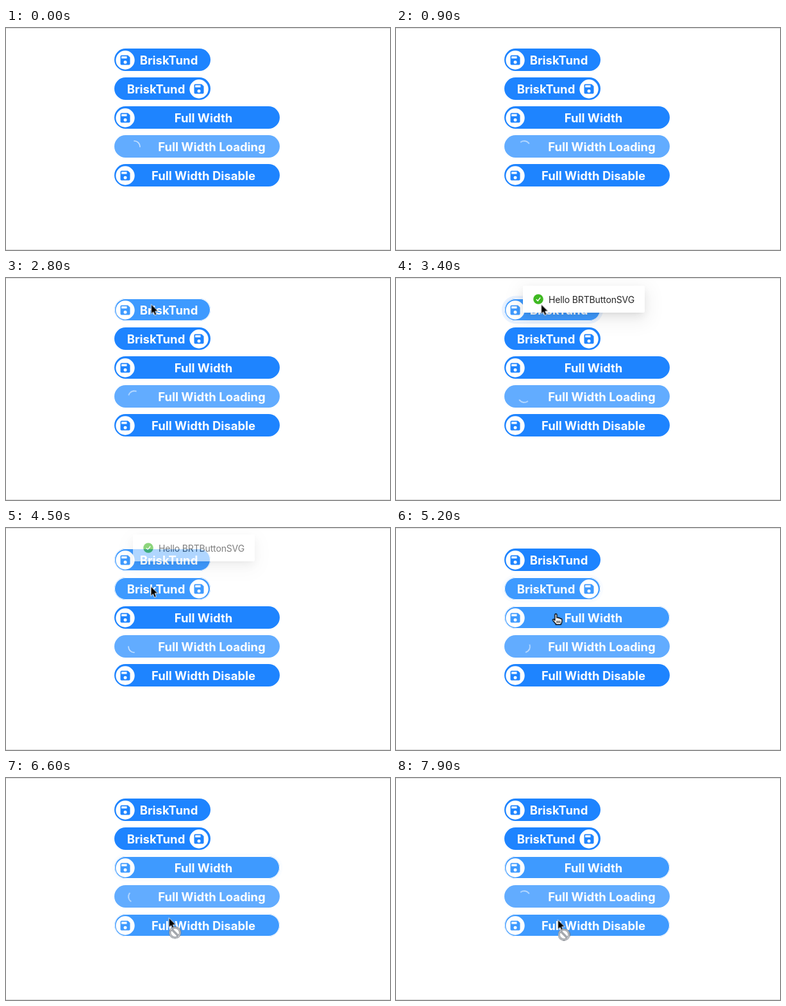
Animation of 599x346 px, one loop 8000 ms. Source, as an HTML page:

```html
<!DOCTYPE html>
<html lang="en">
<head>
<meta charset="utf-8">
<title>Buttons</title>
<style>
  html, body { margin: 0; width: 100%; height: 100%; overflow: hidden; background: #fff; }
  body { position: relative; font-family: Inter, "Liberation Sans", sans-serif; }
  .stage { position: absolute; left: 0; top: 0; width: 599px; height: 346px; overflow: hidden; }
  .rule { position: absolute; left: 0; right: 0; height: 1px; background: #dcdcdc; }

  .btn {
    position: absolute; left: 169px; width: 258px; height: 35px;
    border-radius: 17.5px; color: #1e84ff; background: currentColor;
  }
  .short { width: 150px; }
  .loading { background: #62acff; }
  .label {
    position: absolute; left: var(--mid); top: 0; transform: translateX(-50%);
    font-size: 18.5px; font-weight: 700; line-height: 36px; white-space: nowrap; color: #fff;
  }
  .icon { position: absolute; left: 2px; top: 2.5px; width: 30px; height: 30px; }
  .right .icon { left: auto; right: 3px; }

  .b1 { top: 32px; --mid: 85px; animation: lit1 8s linear infinite; }
  .b2 { top: 77px; --mid: 65px; animation: lit2 8s linear infinite; }
  .b3 { top: 122px; --mid: 139px; animation: lit3 8s linear infinite; }
  .b4 { top: 167px; --mid: 152px; }
  .b5 { top: 212px; --mid: 139px; animation: lit5 8s linear infinite; }
  @keyframes lit1 {
    0%, 31.5%, 58.5%, 100% { color: #1e84ff; box-shadow: inset 0 0 0 1px #fff0; }
    34%, 56.5% { color: #3e9aff; box-shadow: inset 0 0 0 1px #fff; }
  }
  @keyframes lit2 {
    0%, 50%, 71.5%, 100% { color: #1e84ff; box-shadow: inset 0 0 0 1px #fff0; }
    52.5%, 69.5% { color: #3e9aff; box-shadow: inset 0 0 0 1px #fff; }
  }
  @keyframes lit3 {
    0%, 61% { color: #1e84ff; box-shadow: inset 0 0 0 1px #fff0; }
    64%, 100% { color: #3e9aff; box-shadow: inset 0 0 0 1px #fff; }
  }
  @keyframes lit5 {
    0%, 78.5% { color: #1e84ff; box-shadow: inset 0 0 0 1px #fff0; }
    81.5%, 100% { color: #3e9aff; box-shadow: inset 0 0 0 1px #fff; }
  }

  /* Each click starts a toast and, just after, a fading ring */
  .c1 { --at: 3.15s; }
  .c2 { --at: 4.4s; }
  .c3 { --at: 5.66s; }
  .wave {
    --ring: calc(var(--at) + .1s);
    position: absolute; inset: 0; border-radius: 17.5px; opacity: 0;
    animation: spread 8s var(--ring) infinite, fade 8s var(--ring) infinite;
  }
  @keyframes spread {
    0% { box-shadow: 0 0 0 0 #1e84ff; animation-timing-function: cubic-bezier(.08, .82, .17, 1); }
    5%, 100% { box-shadow: 0 0 0 4.5px #1e84ff; }
  }
  @keyframes fade {
    0% { opacity: .2; animation-timing-function: cubic-bezier(.08, .82, .17, 1); }
    25%, 100% { opacity: 0; }
  }

  .spinner {
    position: absolute; left: 20.5px; top: 8.3px; width: 20px; height: 20px;
    animation: spin 1s linear infinite;
  }
  .spinner path { fill: none; stroke: #fff; stroke-opacity: .65; stroke-width: 1.7; stroke-linecap: round; }
  @keyframes spin { to { transform: rotate(360deg); } }

  .toast {
    position: absolute; left: 198px; top: 12px; width: 190px; height: 42px;
    border-radius: 2px; background: #fff; opacity: 0;
    box-shadow: 0 3px 6px -4px rgba(0,0,0,.12), 0 6px 16px rgba(0,0,0,.08), 0 9px 28px 8px rgba(0,0,0,.05);
    animation: toast 8s linear var(--at) infinite;
  }
  .toast svg { position: absolute; left: 16px; top: 13px; width: 16px; height: 16px; }
  .toast span {
    position: absolute; left: 40px; top: 0; line-height: 43px;
    font-size: 14px; letter-spacing: -.15px; color: #262626; white-space: nowrap;
  }
  @keyframes toast {
    0% { opacity: 0; transform: translateY(-5px); }
    2.125%, 6% { opacity: 1; transform: none; }
    9.25%, 100% { opacity: 0; transform: translateY(-8px); }
  }

  .pointer {
    position: absolute; left: 0; top: 0; width: 1px; height: 1px; overflow: visible;
    animation: move 8s ease-in-out infinite;
  }
  @keyframes move {
    0%, 26% { transform: translate(-30px, 100px); }
    32.5%, 47% { transform: translate(226.5px, 41.5px); }
    52%, 58% { transform: translate(226px, 91.5px); }
    63%, 74.5% { transform: translate(249.5px, 134px); }
    79%, 81% { transform: translate(253px, 217px); }
    87% { transform: translate(262px, 228px); }
    94%, 100% { transform: translate(252.5px, 221.5px); }
  }
  .arrow { animation: arrow 8s step-end infinite; }
  .hand { animation: hand 8s step-end infinite; }
  .ban { animation: ban 8s step-end infinite; }
  @keyframes arrow { 0% { opacity: 1; } 61% { opacity: 0; } 76.5%, 100% { opacity: 1; } }
  @keyframes hand { 0% { opacity: 0; } 61% { opacity: 1; } 76.5%, 100% { opacity: 0; } }
  @keyframes ban { 0% { opacity: 0; } 78.5%, 100% { opacity: 1; } }
</style>
</head>
<body>
<svg width="0" height="0" style="position:absolute">
  <symbol id="save" viewBox="0 0 36 36">
    <circle cx="18" cy="18" r="17.6" fill="#fff"/>
    <path fill="currentColor" transform="translate(6 6)" fill-rule="evenodd" d="M17 3H5c-1.1 0-2 .9-2 2v14c0 1.1.9 2 2 2h14c1.1 0 2-.9 2-2V7zM12 19a3 3 0 1 1 0-6 3 3 0 0 1 0 6zM15 9H5V5h10z"/>
  </symbol>
  <symbol id="tick" viewBox="0 0 16 16">
    <circle cx="8" cy="8" r="7.8" fill="#3fb922"/>
    <path d="M4.8 8.2 7.2 10.6 11.2 5.5" fill="none" stroke="#fff" stroke-width="1.4"/>
  </symbol>
</svg>

<div class="stage">
  <div class="rule" style="top:0"></div>
  <div class="rule" style="top:345px"></div>

  <div class="btn short b1 c1"><i class="wave"></i><svg class="icon"><use href="#save"/></svg><span class="label">BriskTund</span></div>
  <div class="btn short right b2 c2"><i class="wave"></i><svg class="icon"><use href="#save"/></svg><span class="label">BriskTund</span></div>
  <div class="btn b3 c3"><i class="wave"></i><svg class="icon"><use href="#save"/></svg><span class="label">Full Width</span></div>
  <div class="btn loading b4">
    <svg class="spinner" viewBox="-10 -10 20 20"><path d="M0-9A9 9 0 0 1 9 0"/></svg>
    <span class="label">Full Width Loading</span>
  </div>
  <div class="btn b5"><svg class="icon"><use href="#save"/></svg><span class="label">Full Width Disable</span></div>

  <div class="toast c1"><svg><use href="#tick"/></svg><span>Hello BRTButtonSVG</span></div>
  <div class="toast c2"><svg><use href="#tick"/></svg><span>Hello BRTButtonSVG</span></div>
  <div class="toast c3"><svg><use href="#tick"/></svg><span>Hello BRTButtonSVG</span></div>

  <svg class="pointer">
    <path class="arrow" d="M0-.5V14.5L3.4 11.4 5.6 16.6 8.4 15.4 6.2 10.3H10.8Z" stroke="#fff" stroke-width=".9"/>
    <g class="hand" stroke="#000" stroke-width="1.4" stroke-linejoin="round">
      <path fill="#fff" d="M-1.6 10V1.2a1.5 1.5 0 0 1 3 0V6q2.5-1.4 3 .6 2.3-1 2.8.9 2.2-.5 2.2 1.5V11.5q0 2-1.5 3.8V16.5H-.3V15.3Q-3 12.5-4.8 9.8q-.5-1.8 1.2-1.6 1.1.4 2 1.8Z"/>
      <path fill="none" stroke-width="1" d="M1.6 10.5v3.6M3.8 10.5v3.6M6 10.5v3.6"/>
    </g>
    <g class="ban" fill="none">
      <circle cx="9.5" cy="22.5" r="8" fill="#fff" stroke="#70757c" stroke-width="3"/>
      <path d="M3.8 16.8 15.2 28.2" stroke="#70757c" stroke-width="2.8"/>
      <circle cx="9.5" cy="22.5" r="8" stroke="#e4e7eb" stroke-width="1.2"/>
      <path d="M3.8 16.8 15.2 28.2" stroke="#e4e7eb"/>
    </g>
  </svg>
</div>
</body>
</html>
```
